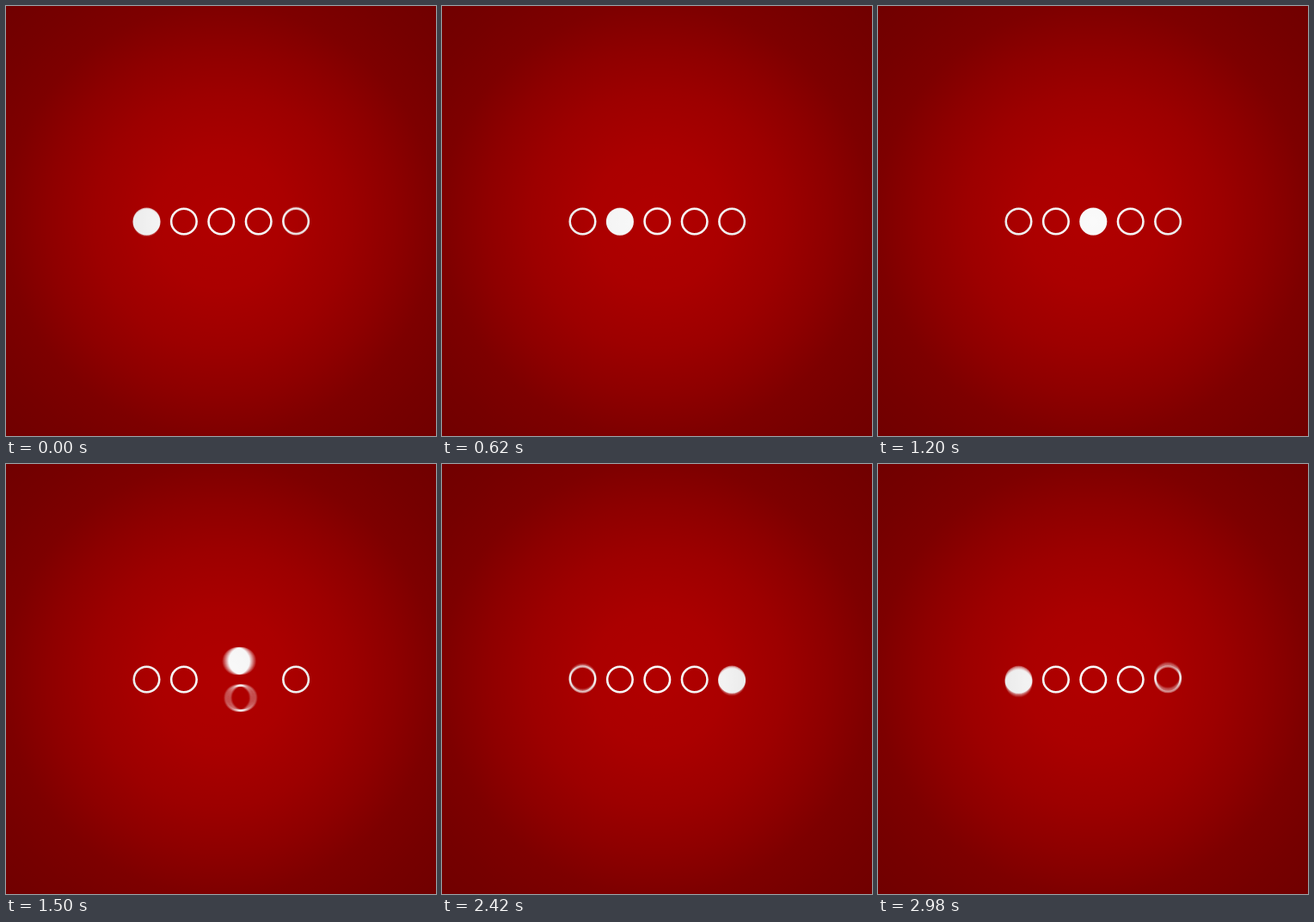
Write an HTML page with a canvas that moves like this. It is 500x500 px and loops after 3 s.

```html
<!DOCTYPE html>
<html lang="en">
<head>
<meta charset="utf-8">
<title>Five circles</title>
<style>
  html, body { margin: 0; width: 100%; height: 100%; overflow: hidden; background: #b40000; }
  canvas { position: absolute; left: 0; top: 0; width: 500px; height: 500px; }
  .vignette {
    position: absolute; left: 0; top: 0; width: 500px; height: 500px;
    background: radial-gradient(circle 354px at 250px 250px,
      rgba(0,0,0,.02) 0, rgba(0,0,0,.05) 22%, rgba(0,0,0,.13) 42%,
      rgba(0,0,0,.21) 57%, rgba(0,0,0,.3) 71%, rgba(0,0,0,.345) 85%, rgba(0,0,0,.375) 100%);
  }
</style>
</head>
<body>
<canvas id="stage" width="500" height="500"></canvas>
<div class="vignette"></div>
<script>
const ctx = document.getElementById('stage').getContext('2d');
const LOOP = 3000, SWAP = 600;
const CX = 250.3, CY = 250.5, GAP = 43.4;
const SAMPLES = 17, SHUTTER_OPEN = -29, SHUTTER_CLOSE = 19;

const slotX = i => CX + (i - 2) * GAP;
const ease = p => p * p * (3 - 2 * p);

function disc(x, y) {
  ctx.beginPath();
  ctx.arc(x, y, 16, 0, 2 * Math.PI);
  ctx.fill();
}

function ring(x, y) {
  ctx.beginPath();
  ctx.arc(x, y, 14.75, 0, 2 * Math.PI);
  ctx.stroke();
}

// The disc trades places with the next ring; the last swap returns it to the start.
function drawPose(time) {
  const t = (time % LOOP + LOOP) % LOOP;
  const from = Math.floor(t / SWAP), to = (from + 1) % 5;
  const angle = Math.PI * ease(t / SWAP - from);
  const middle = (slotX(from) + slotX(to)) / 2;
  const reach = slotX(from) - middle;
  const turn = from % 2 ? -1 : 1;
  const dx = reach * Math.cos(angle);
  const dy = turn * reach * Math.sin(angle);

  for (let i = 0; i < 5; i++) {
    if (i !== from && i !== to) ring(slotX(i), CY);
  }
  ring(middle - dx, CY - dy);
  disc(middle + dx, CY + dy);
}

// Additive samples across the shutter interval give the motion blur.
function render(time) {
  ctx.clearRect(0, 0, 500, 500);
  ctx.globalCompositeOperation = 'lighter';
  ctx.globalAlpha = 1 / SAMPLES;
  ctx.fillStyle = ctx.strokeStyle = '#fff';
  ctx.lineWidth = 2.5;
  for (let s = 0; s < SAMPLES; s++) {
    const k = (s + 0.5) / SAMPLES;
    drawPose(time + SHUTTER_OPEN + k * (SHUTTER_CLOSE - SHUTTER_OPEN));
  }
}

const start = performance.now();
function tick() {
  const elapsed = (performance.now() - start) % LOOP;
  render(Math.floor(elapsed / 20) * 20);
  requestAnimationFrame(tick);
}
tick();
</script>
</body>
</html>
```
